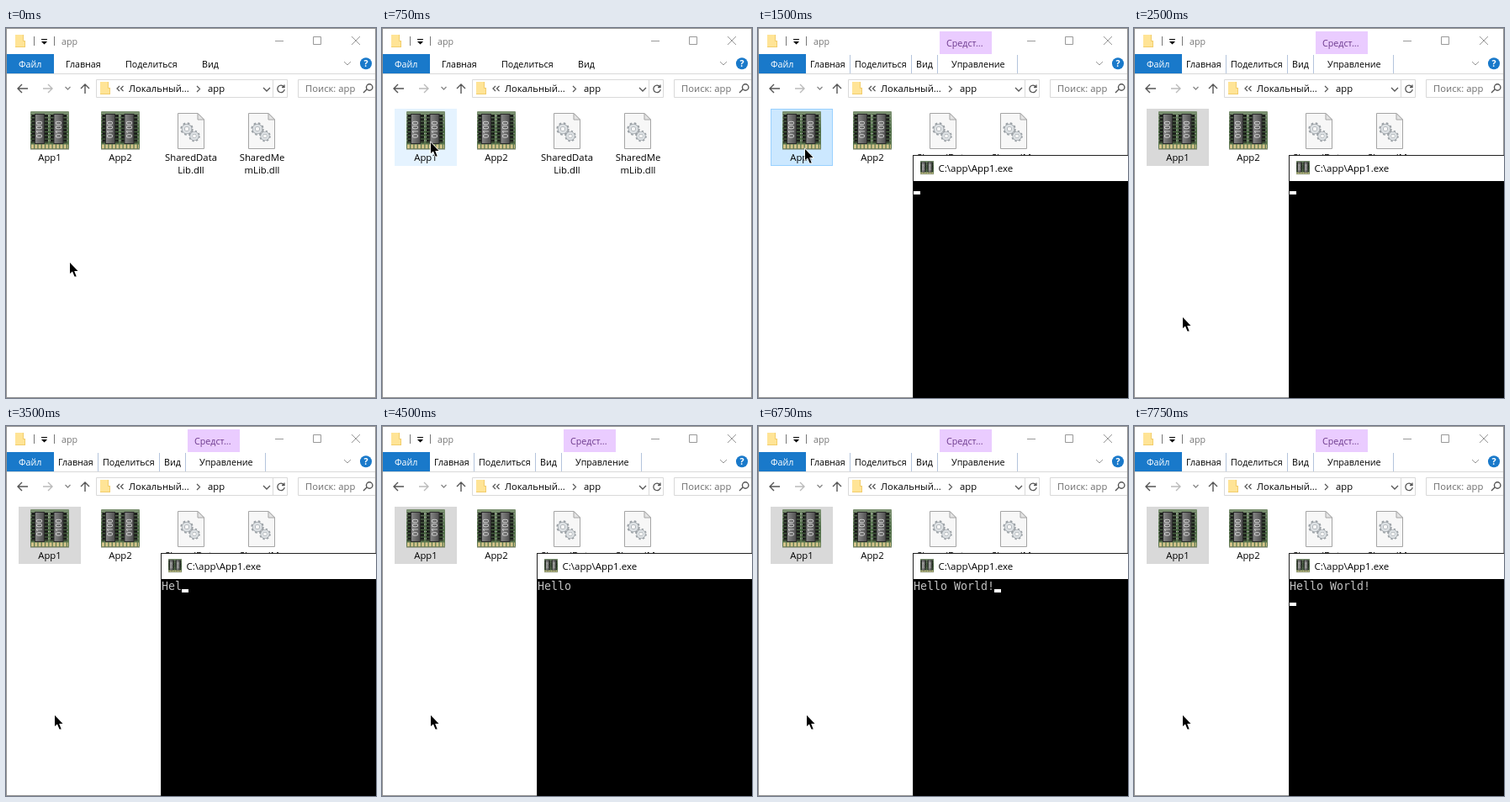
Write an HTML page that moves like this. It is 440 px wide and 440 px high and loops after 8000 ms.

```html
<!DOCTYPE html>
<html lang="ru">
<head>
<meta charset="utf-8">
<title>Console demo</title>
<style>
html, body { margin: 0; width: 100%; height: 100%; overflow: hidden; background: #fff; }
svg { display: block; width: 100%; height: 100%; }
text { font: 10.7px "Open Sans", "Noto Sans", sans-serif; fill: #000; white-space: pre; }
.line { fill: none; stroke: #555; }
.pale { stroke: #bbb; }
.rule { fill: none; stroke: #d9d9d9; }
.label { font-size: 11.3px; text-anchor: middle; }
.address { font-size: 11.25px; }
.console { font: 13.29px "DejaVu Sans Mono", monospace; fill: #c0c0c0; }
</style>
</head>
<body>
<svg viewBox="0 0 440 440">
  <defs>
    <linearGradient id="board" x2="0" y2="1">
      <stop stop-color="#7d9273"/><stop offset=".5" stop-color="#4c6b45"/><stop offset="1" stop-color="#5f7a52"/>
    </linearGradient>
    <linearGradient id="plastic">
      <stop stop-color="#8a8a8a"/><stop offset=".5" stop-color="#6c6c6c"/><stop offset="1" stop-color="#4e4e4e"/>
    </linearGradient>
    <g id="folder">
      <path d="M0 0H10V7H12V15H0Z" fill="#f2cd6c"/>
      <path d="M0 0H9V8H11V14H0Z" fill="#ffe496"/>
    </g>
    <g id="app">
      <rect width="46" height="45" rx="1" fill="url(#board)"/>
      <g id="circuit">
        <path d="M3.5 4V38M18.5 4V38" stroke="#1b1f1a" stroke-width="5" stroke-dasharray="3.2 1"/>
        <path d="M1 5V38M21.5 5V38" stroke="#c5cebf" stroke-dasharray="1 3.2"/>
        <rect x="5.5" y="3.500" width="11" height="35" fill="url(#plastic)" stroke="#2b2b2b"/>
        <text transform="translate(14.2 32) rotate(-90)" style="font-size:9px;fill:#eee">0100</text>
      </g>
      <use href="#circuit" x="22.500"/>
      <path d="M1 42H45" stroke="#d5c58c" stroke-width="5" stroke-dasharray="3 1.3"/>
      <path d="M0 45H46" stroke="#6b7559"/>
    </g>
    <g id="gear" fill="none">
      <circle r="6.4" stroke="#9ba1a6" stroke-width="2.6" stroke-dasharray="2.5 2.53"/>
      <circle r="4.3" stroke="#9ba1a6" stroke-width="4"/>
      <circle r="4.2" stroke="#dce0e3" stroke-width="2.8"/>
    </g>
    <g id="dll">
      <path d="M.5 .5H24L31.5 8V42.5H.5Z" fill="#f7f7f7" stroke="#a5a5a5"/>
      <path d="M24 .5V8H31.5Z" fill="#e4e4e4" stroke="#a5a5a5"/>
      <use href="#gear" transform="translate(11 19)"/>
      <use href="#gear" transform="translate(20 27.5) scale(.88)"/>
    </g>
  </defs>

  <rect width="440" height="440" fill="#fff"/>

  <!-- title bar -->
  <use href="#folder" x="11" y="8"/>
  <path class="line" d="M33.5 10V21M57.5 10V21" style="stroke:#777"/>
  <path d="M42 13H49V14H42ZM42 16H49L45.5 19.5Z"/>
  <text id="title" x="66" y="20">app</text>
  <path id="buttons" fill="none" d="M320 15.5H330M365.5 10.5H374.5V19.5H365.5ZM411 10L421 20M421 10L411 20"/>

  <!-- ribbon -->
  <path class="rule" d="M1 54.5H440"/>
  <rect x="1" y="31" width="56" height="23" fill="#1979ca"/>
  <text x="15" y="47" style="fill:#fff">Файл</text>
  <g id="plainTabs">
    <text x="71" y="47">Главная</text>
    <text x="142" y="47">Поделиться</text>
    <text x="233" y="47">Вид</text>
  </g>
  <g id="toolTabs">
    <rect x="216" y="4" width="62" height="27" fill="#eaccff"/>
    <text x="224" y="21.5" style="fill:#6d3a8c">Средст...</text>
    <path class="rule" d="M109.5 32V54M182.5 32V54M213.5 32V54M308.5 32V54" style="stroke:#b4c4dc"/>
    <text x="62" y="47">Главная</text>
    <text x="115" y="47">Поделиться</text>
    <text x="188" y="47">Вид</text>
    <text x="230" y="47">Управление</text>
  </g>
  <path class="line" d="M402 40L406 44L410 40" style="stroke:#999"/>
  <circle cx="428" cy="42.3" r="7" fill="#1979ca"/>
  <text x="428" y="46.3" text-anchor="middle" style="fill:#fff;font-weight:700">?</text>

  <!-- address row -->
  <path class="line" stroke-width="1.4" d="M26 72H14M19 67L14 72L19 77M94 78V67M89 72L94 67L99 72"/>
  <path class="line pale" stroke-width="1.4" d="M44 72H55M50 67L55 72L50 77"/>
  <path class="line" stroke-width="1.3" d="M70.5 70L73.5 73L76.5 70" style="stroke:#888"/>
  <path class="rule" d="M107.5 61.5H334.5V82.5H107.5ZM317.5 62V82M440 61.5H347.5V82.5H440"/>
  <use href="#folder" x="112" y="64"/>
  <path class="line" stroke-width="1.2" d="M135 69L132 72L135 75M139.5 69L136.5 72L139.5 75M227 69L230.5 72.5L227 76"/>
  <path class="line" stroke-width="1.3" d="M306 71L310 75L314 71M330.5 70A4.2 4.2 0 1 0 331.2 73M331 67.5V70.5H328"/>
  <text class="address" x="146" y="76">Локальный...</text>
  <text class="address" x="240" y="76">app</text>
  <text class="address" x="356" y="76" style="fill:#6d6d6d">Поиск: app</text>
  <path class="line" stroke-width="1.4" d="M425 77L429 73M428.5 70.5a3.7 3.7 0 1 0 7.4 0a3.7 3.7 0 1 0 -7.4 0"/>

  <!-- files -->
  <rect id="selection" x="15.5" y="96.5" width="73" height="67"/>
  <use href="#app" x="29" y="99"/>
  <use href="#app" x="113" y="99"/>
  <use href="#dll" x="204" y="101"/>
  <use href="#dll" x="288" y="101"/>
  <text class="label" x="52" y="158">App1</text>
  <text class="label" x="136" y="158">App2</text>
  <text class="label" x="220" y="158">SharedData</text>
  <text class="label" x="220" y="173">Lib.dll</text>
  <text class="label" x="304.5" y="158">SharedMe</text>
  <text class="label" x="304.5" y="173">mLib.dll</text>
  <rect id="frame" x=".5" y=".5" width="439" height="439"/>

  <!-- console -->
  <g id="console">
    <rect x="184" y="151" width="256" height="289" fill="#222"/>
    <rect x="185" y="152" width="255" height="30" fill="#fff"/>
    <rect x="185" y="182" width="255" height="258"/>
    <use href="#app" transform="translate(193 158) scale(.35)"/>
    <text x="214.5" y="171" style="font-size:11.5px">C:\app\App1.exe</text>
    <text id="typed" class="console" x="185" y="195"></text>
    <rect id="caret" width="8" height="4" fill="#fff"/>
  </g>
  <path id="pointer" d="M0 0V13L3 10.5L5.500 16.500H7.700L5.200 10H9.500Z" stroke="#fff" stroke-width="1.4" paint-order="stroke"/>
</svg>

<script>
const LOOP = 8000;
const LINE = 'Hello World!';
const $ = id => document.getElementById(id);

// Every step changes only the values it names.
const steps = [
  [0, { x: 76, y: 279, mark: 'none', active: false, tools: false, open: false, chars: 0, row: 0, caret: true }],
  [500, { x: 70, y: 226 }],
  [750, { x: 58, y: 136, mark: 'hover' }],
  [1000, { x: 56, y: 127, mark: 'selected', active: true, tools: true }],
  [1250, { x: 56, y: 125 }],
  [1500, { y: 144, active: false, open: true }],
  [1750, { x: 57, y: 262, mark: 'idle' }],
  [2000, { x: 58, y: 344, caret: false }],
  [2500, { caret: true }],
  [3000, { chars: 1, caret: false }],
  [3250, { chars: 2 }],
  [3500, { chars: 3, caret: true }],
  [3750, { chars: 4 }],
  [4000, { chars: 5, caret: false }],
  [4250, { chars: 6, caret: true }],
  [4500, { caret: false }],
  [4750, { chars: 7, caret: true }],
  [5250, { chars: 8, caret: false }],
  [5500, { chars: 9 }],
  [5750, { chars: 10, caret: true }],
  [6000, { chars: 11 }],
  [6250, { caret: false }],
  [6500, { chars: 12 }],
  [6750, { caret: true }],
  [7000, { row: 1 }],
  [7250, { caret: false }],
  [7750, { caret: true }]
];

const marks = {
  none: ['none', 'none'],
  hover: ['#e5f3ff', '#e5f3ff'],
  selected: ['#cce8ff', '#99d1ff'],
  idle: ['#d9d9d9', '#d9d9d9']
};

const show = (id, on) => $(id).setAttribute('visibility', on ? 'inherit' : 'hidden');
const paint = (id, fill, stroke) => {
  $(id).style.fill = fill;
  $(id).style.stroke = stroke;
};

function stateAt(time) {
  return Object.assign({}, ...steps.filter(([start]) => start <= time).map(([, change]) => change));
}

function render(s) {
  paint('selection', ...marks[s.mark]);
  paint('frame', 'none', s.active ? '#4d4d4d' : '#929292');
  paint('buttons', 'none', s.active ? '#000' : '#999');
  paint('title', s.active ? '#000' : '#777', 'none');
  show('plainTabs', !s.tools);
  show('toolTabs', s.tools);
  $('console').style.display = s.open ? '' : 'none';
  $('typed').textContent = LINE.slice(0, s.chars);
  $('caret').setAttribute('x', 185 + (s.row ? 0 : s.chars * 8));
  $('caret').setAttribute('y', 194 + s.row * 16);
  show('caret', s.caret);
  $('pointer').setAttribute('transform', `translate(${s.x} ${s.y})`);
}

const began = performance.now();
function tick() {
  render(stateAt((performance.now() - began) % LOOP));
  requestAnimationFrame(tick);
}
tick();
</script>
</body>
</html>
```
